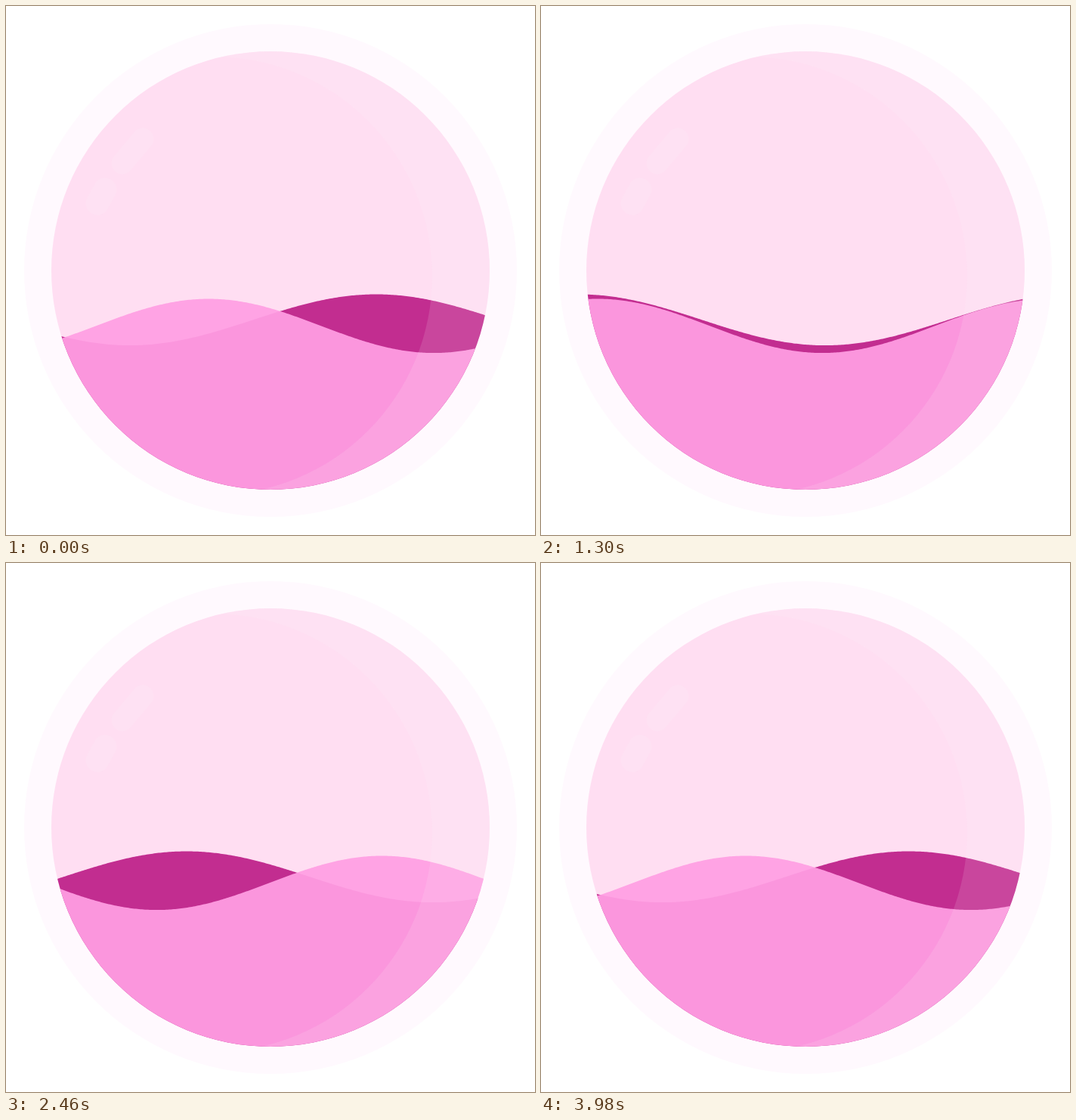
Write an HTML page with a canvas that moves like this. It is 700x700 px and loops after 4000 ms.

```html
<!DOCTYPE html>
<html lang="en">
<head>
<meta charset="utf-8">
<title>Liquid globe</title>
<style>
  html, body { margin: 0; width: 100%; height: 100%; overflow: hidden; background: #fff; }
  canvas { display: block; width: 700px; height: 700px; }
</style>
</head>
<body>
<canvas id="stage" width="700" height="700"></canvas>
<script>
const ctx = document.getElementById('stage').getContext('2d');
const LOOP = 4000, STEP = 20, TAU = Math.PI * 2;
const C = 350, R = 290;
const GLOSS = 'rgba(245,245,245,0.12)';

// dir: travel direction; each wave moves one wavelength per loop
const back = { crest: 490, length: 652, mid: 415.3, amp: 33.8, dir: 1, color: '#c22d90' };
const front = { crest: 268, length: 596, mid: 423.3, amp: 35.8, dir: -1, color: 'rgba(255,159,227,0.93)' };

function disc(x, y, r, color) {
  ctx.fillStyle = color;
  ctx.beginPath();
  ctx.arc(x, y, r, 0, TAU);
  ctx.fill();
}

function drawWave(w, phase) {
  const crest = w.crest + w.dir * w.length * phase;
  ctx.fillStyle = w.color;
  ctx.beginPath();
  ctx.moveTo(50, 660);
  for (let x = 50; x <= 650; x += 2) {
    ctx.lineTo(x, w.mid - w.amp * Math.cos(TAU * (x - crest) / w.length));
  }
  ctx.lineTo(650, 660);
  ctx.fill();
}

function drawShade() {
  ctx.fillStyle = GLOSS;
  ctx.save();
  ctx.beginPath();
  ctx.rect(0, 0, 700, 700);
  ctx.arc(274, 357, R, 0, TAU);
  ctx.clip('evenodd');
  ctx.fillRect(280, 50, 370, 600);
  ctx.restore();
}

function capsule(x1, y1, x2, y2, width) {
  ctx.strokeStyle = GLOSS;
  ctx.lineWidth = width;
  ctx.lineCap = 'round';
  ctx.beginPath();
  ctx.moveTo(x1, y1);
  ctx.lineTo(x2, y2);
  ctx.stroke();
}

function draw(now) {
  const phase = Math.floor((now % LOOP) / STEP) * STEP / LOOP;
  ctx.fillStyle = '#fff';
  ctx.fillRect(0, 0, 700, 700);
  disc(C, C, 326, '#fff9fe');
  disc(C, C, R, '#ffdef2');

  ctx.save();
  ctx.beginPath();
  ctx.arc(C, C, R, 0, TAU);
  ctx.clip();
  drawWave(back, phase);
  drawWave(front, phase);
  drawShade();
  ctx.restore();

  capsule(181, 176, 154, 208, 29);
  capsule(131, 243, 121, 261, 31);
}

function tick(now) {
  draw(now);
  requestAnimationFrame(tick);
}

draw(0);
requestAnimationFrame(tick);
</script>
</body>
</html>
```
